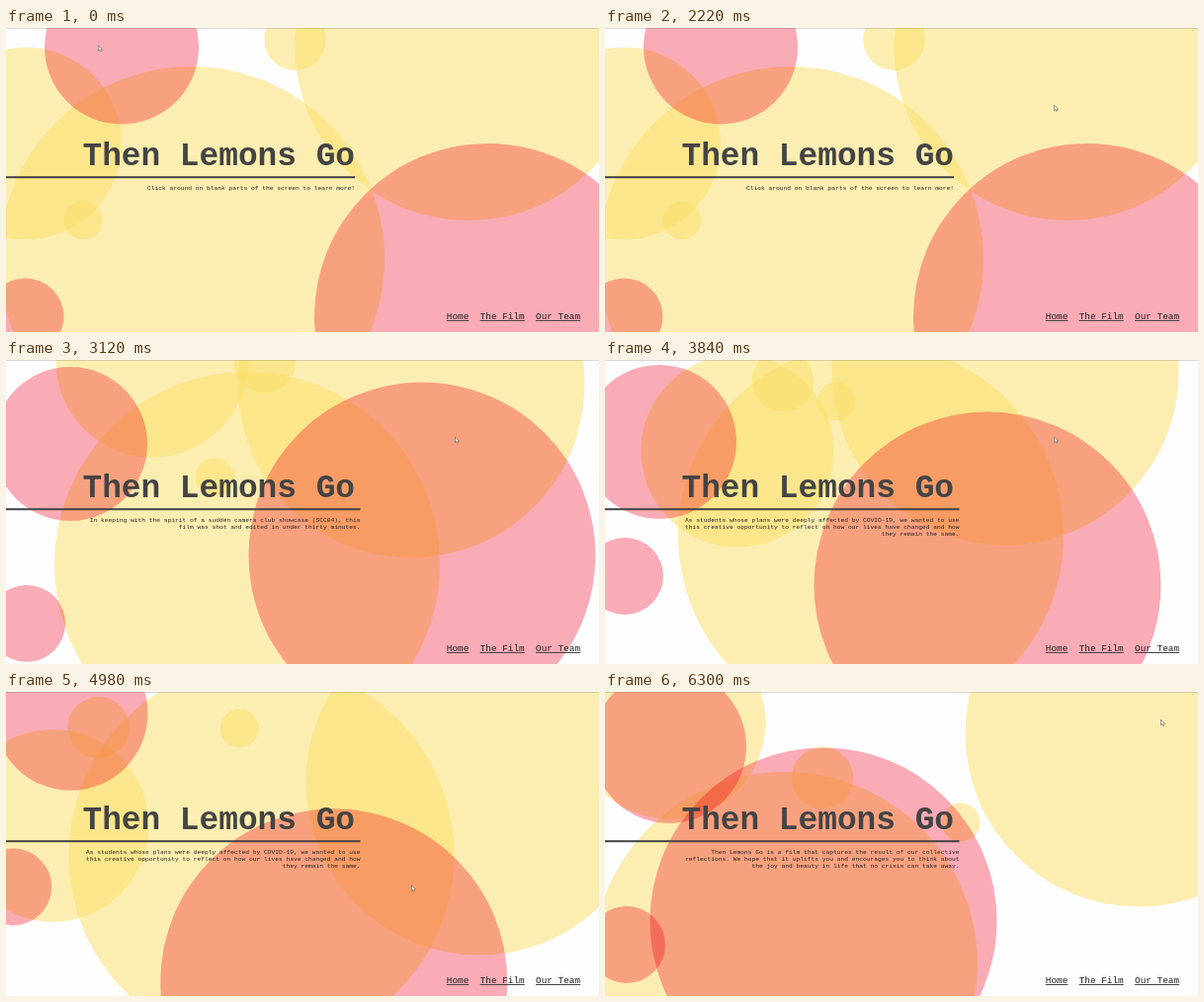
An HTML page that plays this animation: 600x308 px, repeating every 6360 ms.

```html
<!DOCTYPE html>
<html lang="en">
<head>
<meta charset="utf-8">
<title>Then Lemons Go</title>
<style>
  html, body { margin: 0; width: 100%; height: 100%; overflow: hidden; background: #fdfdfe; }
  svg { display: block; width: 600px; height: 308px; isolation: isolate; background: #fdfdfe; }
  text { font-family: "Courier New", "Liberation Mono", monospace; fill: #444; }
  .title { font-size: 32.8px; font-weight: bold; text-anchor: end; }
  .note { font-size: 6.25px; text-anchor: end; fill: #222; }
  .link { font-size: 9.4px; fill: #222; }
  .yellow { fill: #fbdf66; fill-opacity: .5; }
  .pink { fill: #fbadb7; mix-blend-mode: multiply; }
</style>
</head>
<body>
<svg viewBox="0 0 600 308">
  <g id="circles"></g>
  <rect width="600" height="1" opacity=".14"/>
  <text class="title" x="353" y="139">Then Lemons Go</text>
  <rect id="rule" y="150.2" height="2" fill="#444"/>
  <g id="notes"></g>
  <g id="links"></g>
  <path id="cursor" d="M0 0V5.6L1.3 4.5L2.2 6.4L3.1 6L2.3 4.1H4Z"
        fill="#fff" stroke="#555" stroke-width=".6"/>
</svg>
<script>
const LOOP = 6360;
const UNIT = 39; // sizes and starting places are multiples of this
const LINK_CHAR = 5.64;
const byId = id => document.getElementById(id);
const mix = (a, b, u) => a + (b - a) * u;
const smooth = u => u * u * (3 - 2 * u);

function add(parent, tag, attrs, text = '') {
  const el = document.createElementNS('http://www.w3.org/2000/svg', tag);
  for (const name in attrs) el.setAttribute(name, attrs[name]);
  el.textContent = text;
  return parent.appendChild(el);
}

// Each circle rests at home, then drifts in straight legs through its stops.
const legEnds = [2240, 3120, 3840, 4560, 5460, 6300];

function circle(kind, size, home, ...stops) {
  const el = add(byId('circles'), 'circle', { class: kind, r: size * UNIT });
  return { el, path: [home.map(n => n * UNIT), ...stops] };
}

const circles = [
  circle('yellow', 5, [4.82, 6], [244, 207], [269, 178], [279, 136], [235, 199], [182, 276]),
  circle('yellow', 2.5, [.5, 3], [148, 1], [134, 92], [47, 178], [47, 87], [65, 31]),
  circle('yellow', 4.5, [12, .5], [410, 25], [405, 12], [426, 100], [539, 81], [540, 42]),
  circle('yellow', .8, [7.5, .3], [262, 2], [180, 21], [65, 65], [126, 3], [220, 87]),
  circle('yellow', .5, [2, 5], [211, 119], [234, 42], [203, 42], [274, 31], [360, 132]),
  circle('pink', 2, [3, .5], [65, 85], [55, 83], [65, 26], [66, 17], [65, 55]),
  circle('pink', 1, [.5, 7.5], [21, 267], [20, 219], [2, 154], [13, 247], [22, 256]),
  circle('pink', 4.5, [12.5, 7.5], [421, 198], [387, 228], [364, 298], [295, 289], [221, 232])
];

function drift(path, t) {
  if (t <= legEnds[0]) return path[0];
  const next = legEnds.findIndex(end => end > t);
  if (next < 0) return path[path.length - 1];
  const u = (t - legEnds[next - 1]) / (legEnds[next] - legEnds[next - 1]);
  return path[next].map((n, axis) => mix(path[next - 1][axis], n, u));
}

const cursorStart = [93.5, 17.5];
const cursorMoves = [
  { from: 1000, to: 1980, point: [454.5, 78] },
  { from: 3960, to: 4500, point: [388.5, 182.5] },
  { from: 4680, to: 5280, point: [432, 209] },
  { from: 5520, to: 6240, point: [562.5, 28] }
];

function cursorAt(t) {
  return cursorMoves.reduce((place, { from, to, point }) => {
    const u = smooth(Math.min(1, Math.max(0, (t - from) / (to - from))));
    return place.map((n, axis) => mix(n, point[axis], u));
  }, cursorStart);
}

function note(start, right, ...lines) {
  const el = add(byId('notes'), 'g', {});
  lines.forEach((line, i) => add(el, 'text', { class: 'note', x: right, y: 164 + i * 7.2 }, line));
  return { start, right, el };
}

const notes = [
  note(0, 353, 'Click around on blank parts of the screen to learn more!'),
  note(2280, 358.5,
    'In keeping with the spirit of a sudden camera club showcase (SCC04), this',
    'film was shot and edited in under thirty minutes.'),
  note(3480, 358.5,
    'As students whose plans were deeply affected by COVID-19, we wanted to use',
    'this creative opportunity to reflect on how our lives have changed and how',
    'they remain the same.'),
  note(5040, 358.5,
    'Then Lemons Go is a film that captures the result of our collective',
    'reflections. We hope that it uplifts you and encourages you to think about',
    'the joy and beauty in life that no crisis can take away.')
];

let linkX = 445.8;
for (const label of ['Home', 'The Film', 'Our Team']) {
  const width = label.length * LINK_CHAR;
  add(byId('links'), 'text', { class: 'link', x: linkX, y: 295.3 }, label);
  add(byId('links'), 'rect', { x: linkX, y: 296, width, height: 1, fill: '#444' });
  linkX += width + 2 * LINK_CHAR;
}

function draw(t) {
  for (const { el, path } of circles) {
    const [x, y] = drift(path, t);
    el.setAttribute('cx', x);
    el.setAttribute('cy', y);
  }
  byId('cursor').setAttribute('transform', `translate(${cursorAt(t)})`);
  const current = notes.filter(n => n.start <= t).pop();
  for (const n of notes) n.el.setAttribute('display', n === current ? 'inline' : 'none');
  byId('rule').setAttribute('width', current.right);
}

function tick() {
  draw(performance.now() % LOOP);
  requestAnimationFrame(tick);
}
tick();
</script>
</body>
</html>
```
